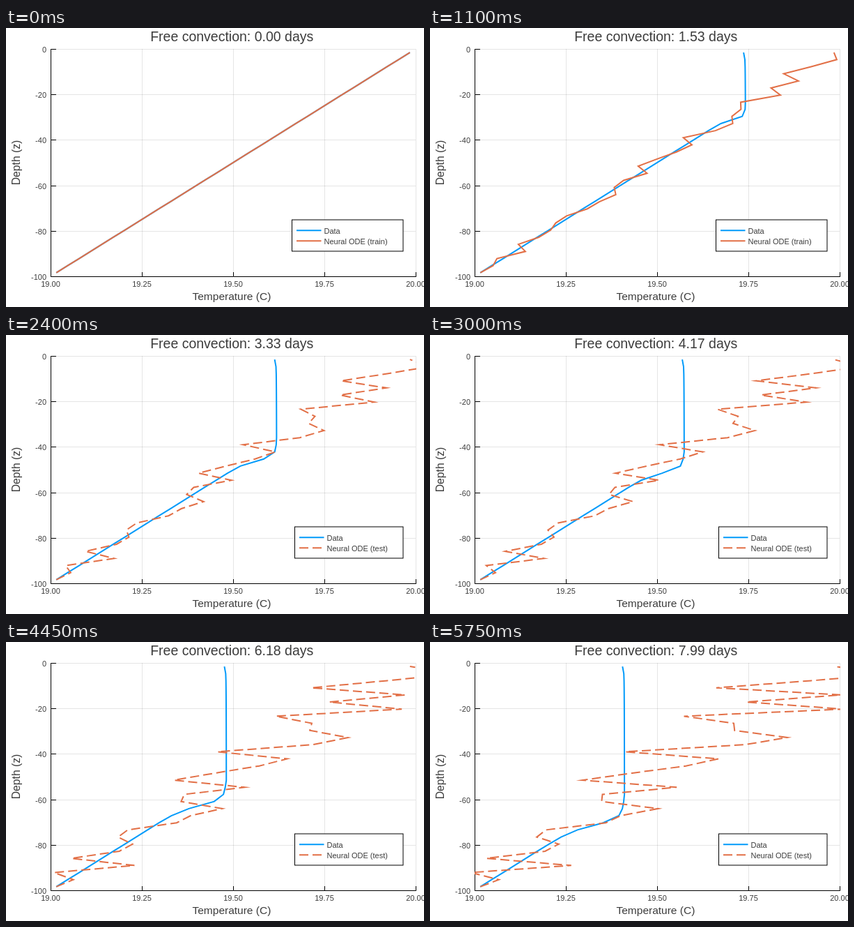
These frames come from a looping animation (600 px wide and 400 px high, 5.8 s). An HTML page with a canvas:

```html
<!DOCTYPE html>
<html lang="en">
<head>
<meta charset="utf-8">
<title>Free convection</title>
<style>
html, body { margin: 0; width: 100%; height: 100%; overflow: hidden; background: #fff; }
canvas { display: block; width: 600px; height: 400px; }
</style>
</head>
<body>
<canvas id="plot" width="600" height="400"></canvas>
<script>
const ctx = document.getElementById("plot").getContext("2d");
const FRAME = 50, COUNT = 116, FRAMES_PER_DAY = 14.4, TRAIN_DAYS = 3;
const LEFT = 64, RIGHT = 588, TOP = 30, BOTTOM = 356;
const BLUE = "#009afa", ORANGE = "#e26f46", INK = "#3c3c3c", GRID = "rgba(0,0,0,0.1)";
const FONT = '"Liberation Sans", Arial, sans-serif';
const DASH = [13, 6];

// Drift of the neural profile in px per day, one rate per level from the surface down
const DRIFT = [
  0, 13.4, 0, -15, 9.5, -5.5, 14, -12.6, -1.6, 0.6, 12.1, 6.6, -12.9, 5.9, 2.1, -5.5,
  -12.4, 6.6, -4.7, -2.8, 9.4, 4.7, 4.1, -4.6, -4.2, 1.8, 1.4, -7.1, 10.2, -5.8, 1.3, 0
];
const LEVELS = DRIFT.length;

const levelY = k => TOP + (k + 0.5) / LEVELS * (BOTTOM - TOP);
const startX = k => RIGHT - (k + 0.5) / LEVELS * (RIGHT - LEFT);
const neuralX = (k, day) => startX(k) + DRIFT[k] * day;

// A mixed layer that cools with the square root of time, blended into the first gradient
function dataX(k, day) {
  const drop = Math.max(109.3 * Math.sqrt(day), 1e-6);
  const mixed = RIGHT - drop;
  const s = (mixed - startX(k)) / drop;
  const blend = 1 / (1 + Math.exp((0.197 - s) / 0.025));
  const skin = 2 * Math.exp(-2 * k) + 0.8 * Math.exp(-k / 5);
  const layer = mixed - 0.1 * drop * Math.max(s, 0) - skin;
  return layer + (startX(k) - layer) * blend;
}

function stroke(points, color, width, dash = []) {
  ctx.strokeStyle = color;
  ctx.lineWidth = width;
  ctx.setLineDash(dash);
  ctx.beginPath();
  points.forEach(([x, y]) => ctx.lineTo(x, y));
  ctx.stroke();
  ctx.setLineDash([]);
}

const vline = (x, y0, y1, color) => stroke([[x + 0.5, y0], [x + 0.5, y1]], color, 1);
const hline = (y, x0, x1, color) => stroke([[x0, y + 0.5], [x1, y + 0.5]], color, 1);

function text(str, x, y, size, align = "center") {
  ctx.font = size + "px " + FONT;
  ctx.textAlign = align;
  ctx.fillStyle = INK;
  ctx.fillText(str, x, y);
}

function drawAxes() {
  const ticksX = [0, 1, 2, 3, 4].map(i => LEFT + i * 131);
  const ticksY = [0, 1, 2, 3, 4, 5].map(i => Math.round(TOP + i * 65.2));
  ticksX.forEach(x => vline(x, TOP, BOTTOM, GRID));
  ticksY.forEach(y => hline(y, LEFT, RIGHT, GRID));
  vline(LEFT, TOP, BOTTOM + 1, "#000");
  hline(BOTTOM, LEFT, RIGHT + 1, "#000");
  ticksX.forEach((x, i) => {
    vline(x, BOTTOM - 6, BOTTOM, "#000");
    text((19 + i / 4).toFixed(2), x, 370.6, 11);
  });
  ticksY.forEach((y, i) => {
    hline(y, LEFT, LEFT + 8, "#000");
    text(String(0 - 20 * i), 58, y + 4.5, 11, "right");
  });
  text("Temperature (C)", 323.9, 390, 15.5);
  ctx.save();
  ctx.translate(20.3, 193);
  ctx.rotate(-Math.PI / 2);
  text("Depth (z)", 0, 0, 15.7);
  ctx.restore();
}

function drawLegend(train) {
  const x = train ? 410.5 : 414.5;
  ctx.fillStyle = "#fff";
  ctx.fillRect(x, 275, 570 - x, 45);
  ctx.strokeStyle = "#000";
  ctx.lineWidth = 1;
  ctx.strokeRect(x, 275, 570 - x, 45);
  stroke([[x + 6.5, 290.2], [x + 42, 290.2]], BLUE, 2);
  stroke([[x + 6.5, 305.3], [x + 42, 305.3]], ORANGE, 2, train ? [] : DASH);
  text("Data", x + 46, 294.5, 11, "left");
  text(`Neural ODE (${train ? "train" : "test"})`, x + 46, 309.5, 11, "left");
}

// Points run from the bottom up, so dashes start at depth
function profile(fn, day) {
  return DRIFT.map((_, k) => [fn(k, day), levelY(k)]).reverse();
}

function draw(index) {
  const day = index / FRAMES_PER_DAY;
  const train = day <= TRAIN_DAYS;
  ctx.fillStyle = "#fff";
  ctx.fillRect(0, 0, 600, 400);
  drawAxes();
  text(`Free convection: ${day.toFixed(2)} days`, 324.2, 19, 19.5);
  ctx.save();
  ctx.beginPath();
  ctx.rect(LEFT, TOP, RIGHT - LEFT + 1, BOTTOM - TOP);
  ctx.clip();
  stroke(profile(dataX, day), BLUE, 2);
  stroke(profile(neuralX, day), ORANGE, 2, train ? [] : DASH);
  ctx.restore();
  drawLegend(train);
}

const start = performance.now();
function tick() {
  draw(Math.floor((performance.now() - start) / FRAME) % COUNT);
  requestAnimationFrame(tick);
}
tick();
</script>
</body>
</html>
```
